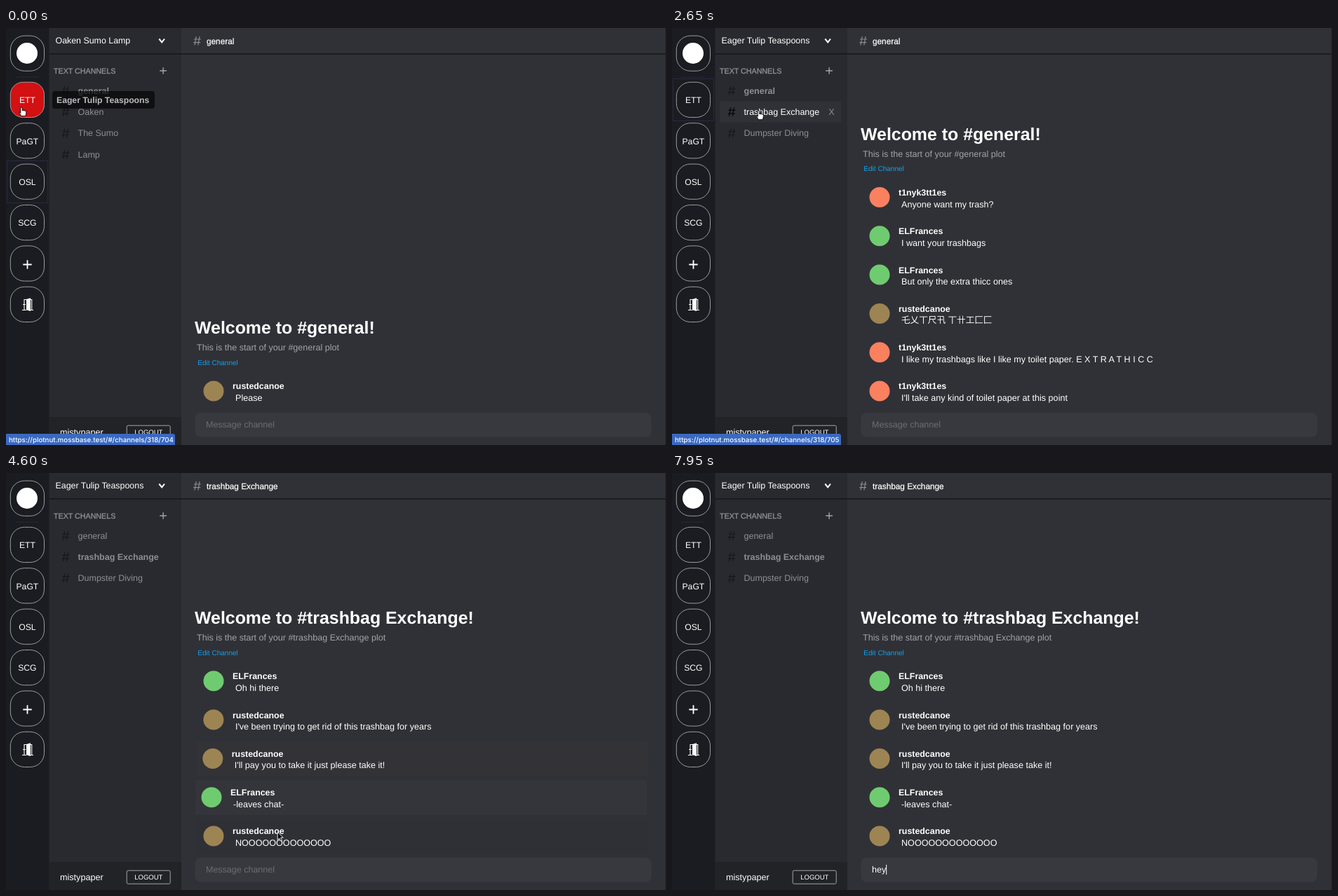
These frames come from a looping animation (941x595 px, 8000 ms). An HTML page:

```html
<!DOCTYPE html>
<html lang="en">
<head>
<meta charset="utf-8">
<title>Chat rooms</title>
<style>
  html, body { margin: 0; width: 100%; height: 100%; overflow: hidden; background: #303136; }
  svg { display: block; width: 100vw; height: 100vh; }
  text { font: 12.6px "Liberation Sans", Arial, "Noto Sans CJK JP", sans-serif; fill: #fff; text-rendering: geometricPrecision; white-space: pre; }
  .bold { font-weight: 700; }
  .mid { text-anchor: middle; }
  .line { fill: none; stroke: #fff; }
  .tile { fill: #1b1c21; stroke: #9c9da0; }
  .focus { fill: none; stroke: #272841; }
  .channel text { fill: #8d8e92; }
  .channel .hash { stroke: #17181b; }
  .channel .over { visibility: hidden; }
  .channel.hover .over { visibility: visible; }
  .channel.hover .label { fill: #fff; }
  .channel.hover .hash { stroke: #050506; }
</style>
</head>
<body>
<svg id="stage" viewBox="0 0 941 595" preserveAspectRatio="none"></svg>
<script>
const LOOP = 8000;
const SERVERS = { oaken: "Oaken Sumo Lamp", eager: "Eager Tulip Teaspoons" };
const LINK = "https://plotnut.mossbase.test/#/channels/318/";
const CORAL = ["t1nyk3tt1es", "#fb8060"], GREEN = ["ELFrances", "#6fcb70"], BROWN = ["rustedcanoe", "#9d8453"];
const OAKEN_LIST = ["general", "Oaken", "The Sumo", "Lamp"];
const EAGER_LIST = ["general", "trashbag Exchange", "Dumpster Diving"];

const scenes = [
  { from: 0, server: SERVERS.oaken, list: OAKEN_LIST, channel: "general", rows: [[BROWN, "Please"]] },
  { from: 1000, server: SERVERS.eager, list: OAKEN_LIST, channel: "", rows: [] },
  { from: 1450, server: SERVERS.eager, list: EAGER_LIST, channel: "general", rows: [
    [CORAL, "Anyone want my trash?"],
    [GREEN, "I want your trashbags"],
    [GREEN, "But only the extra thicc ones"],
    [BROWN, "乇乂丅尺卂 丅卄工匚匚"],
    [CORAL, "I like my trashbags like I like my toilet paper. E X T R A T H I C C"],
    [CORAL, "I'll take any kind of toilet paper at this point"]] },
  { from: 3000, server: SERVERS.eager, list: EAGER_LIST, channel: "trashbag Exchange", rows: [
    [GREEN, "Oh hi there"],
    [BROWN, "I've been trying to get rid of this trashbag for years"],
    [BROWN, "I'll pay you to take it just please take it!"],
    [GREEN, "-leaves chat-"],
    [BROWN, "NOOOOOOOOOOOOO"]] }
];

// Pointer stops: time, x, y
const path = [
  [0, 24, 119.5], [300, 24, 116.5], [1900, 24, 116.5], [2050, 45, 117], [2250, 95, 121],
  [2500, 125.5, 124.5], [2700, 125.5, 124.5], [3100, 139.5, 120], [3600, 139.5, 120],
  [4000, 235, 230], [4300, 320, 345], [4470, 360, 438], [4600, 387, 512],
  [4800, 425, 560], [5300, 455, 577], [5900, 467.5, 573.5]
];
// Times at which the pointer enters each message row, then leaves the last
const rowTimes = [4160, 4290, 4390, 4470, 4600, 4740];
const keys = [[7100, "h"], [7250, "he"], [7400, "hey"]];

const text = (x, y, str, attrs = "") => `<text x="${x}" y="${y}" ${attrs}>${str}</text>`;
const rect = (x, y, w, h, attrs) => `<rect x="${x}" y="${y}" width="${w}" height="${h}" ${attrs}/>`;
const size = (px, fill = "#fff") => `style="font-size:${px}px;fill:${fill}"`;
const hash = (x, y, stroke) =>
  `<path class="hash" transform="translate(${x} ${y})" d="M4.2 0L2 12.5M9 0L6.8 12.5M1 4H11M.2 8.7H10.2" fill="none" stroke="${stroke}" stroke-width="1.2"/>`;

function tile(i, label) {
  const y = i ? 18.9 + i * 58.4 : 11.1;
  return rect(6.3, y, 48.2, 50.2, `rx="20" class="tile" id="tile${i}"`) +
    text(30.4, y + 29.8, label, `class="mid" ${size(12.2)}`);
}

function channelRow(name, i, current) {
  const y = 89 + i * 30.4;
  return `<g class="channel">${rect(68, y - 15, 173, 30, 'rx="2" fill="#303136" class="over"')}
    ${hash(79.5, y - 6, "#17181b")}
    ${text(102.5, y + 4.5, name, `class="label ${name === current ? "bold" : ""}" style="font-size:12.5px"`)}
    ${text(227.5, y + 5, "X", 'class="mid over"')}</g>`;
}

function messageRow([[name, color], body], y) {
  return `<g>${rect(273, y - 19.7, 644, 50, 'rx="3" fill="#35363b" opacity="0"')}
    <g class="message"><circle cx="296" cy="${y + 5}" r="14.5" fill="${color}"/>
    ${text(323, y + 2.4, name, `class="bold" ${size(12.4)}`)}
    ${text(327, y + 19, body, size(12.6))}</g></g>`;
}

function sceneMarkup({ server, list, channel, rows }) {
  const lift = 55.3 * (rows.length - 1);
  return `<g class="scene">
    ${text(70.5, 22, server, size(12.4))}
    ${list.map((name, i) => channelRow(name, i, channel)).join("")}
    ${text(286, 23, channel, `${size(11.8)} stroke="#fff" stroke-width=".25"`)}
    ${text(269, 436 - lift, `Welcome to #${channel}!`, `class="bold" ${size(24.9)}`)}
    ${text(272, 460.3 - lift, `This is the start of your #${channel} plot`, size(12.55, "#a2a3a6"))}
    ${text(273.3, 480.7 - lift, "Edit Channel", size(10.05, "#10a0ee"))}
    ${rows.map((row, i) => messageRow(row, 513 - lift + i * 55.3)).join("")}</g>`;
}

const beam = "M-3.5-6.5Q0-6.5 0-4.5V4.5Q0 6.5-3.5 6.5M3.5-6.5Q0-6.5 0-4.5V4.5Q0 6.5 3.5 6.5";
const stage = document.getElementById("stage");
stage.innerHTML = `
  ${rect(0, 0, 941, 595, 'fill="#303136"')}
  ${rect(0, 0, 62, 595, 'fill="#1b1c21"')}
  ${rect(61.5, 0, 188.5, 595, 'fill="#292a2f"')}
  ${rect(61.5, 555, 188.5, 40, 'fill="#222327"')}
  ${rect(61.5, 36.2, 880, 1.6, 'fill="#17181b"')}
  ${rect(940, 0, 1, 595, 'fill="#242428"')}
  ${rect(13, 69.5, 34, 1, 'fill="#282a33"')}
  <rect id="focus" class="focus" x="1.5" width="58" height="60"/>
  ${["", "ETT", "PaGT", "OSL", "SCG", "", ""].map((label, i) => tile(i, label)).join("")}
  <circle cx="30" cy="36" r="15" fill="#fff"/>
  <path class="line" d="M24.3 337.5H36.7M30.5 331.3V343.7" stroke-width="1.8"/>
  <path d="M29 387L35 385.3V404L29 402.3Z" fill="#fff"/>
  <path class="line" d="M23 402.5H29M35 402.5H39M26 402V387.5H29M35 387.5H36.7V402M24 394.5H28" stroke-width="1.1"/>
  <path class="line" d="M218.3 15.5L222.2 20.3L226 15.5" stroke-width="2"/>
  ${text(68, 64.6, "TEXT CHANNELS", `${size(10.7, "#929397")} stroke="#929397" stroke-width=".3"`)}
  <path class="line" d="M219.3 61H228.9M224.1 56.2V65.8" style="stroke:#a4a5a8" stroke-width="1.4"/>
  ${hash(267, 12, "#8b8c90")}
  ${scenes.map(sceneMarkup).join("")}
  ${rect(269.5, 549, 650.5, 34.5, 'rx="8" fill="#38393e"')}
  <text id="field" x="285" y="570.2" style="font-size:12.5px"></text>
  <rect id="caret" y="559" width="1" height="14" fill="#fff"/>
  ${text(77, 580.6, "mistypaper")}
  ${rect(172.2, 567.2, 62, 19, 'rx="2" class="line" style="stroke:#a3a4a7"')}
  ${text(203.3, 580.4, "LOGOUT", `class="mid" ${size(9.5)}`)}
  <g id="tooltip">${rect(66, 90, 146, 25, 'rx="4" fill="#050506"')}
    ${text(72, 106.8, SERVERS.eager, `class="bold" ${size(12.2)}`)}</g>
  <g id="status"><path id="bar" fill="#3a69c1"/>
    <text id="url" x="4" y="590.6" style="font:500 9.75px Inter, 'Open Sans', sans-serif"></text></g>
  <g id="pointer">
    <path id="hand" d="M-3.2 2V-5q0-1.4 1.2-1.4t1.2 1.4V-1.6q1-1 1.9 .1q1.1-.8 1.9 .2q1.3-.5 1.8 .8V2.5L3.8 6.2H-2L-5 1.8q-.6-1.5 .6-1.4z" fill="#fff" stroke="#000" stroke-width=".9"/>
    <path id="arrow" d="M0 0V11.2l2.6-2.4 1.7 4 1.9-.8-1.7-3.9H8z" fill="#000" stroke="#fff" stroke-width=".9"/>
    <g id="beam" fill="none"><path d="${beam}" stroke="#eee" stroke-width="2.4"/><path d="${beam}" stroke="#222" stroke-width=".9"/></g>
  </g>`;

const $ = id => document.getElementById(id);
const sceneNodes = [...stage.querySelectorAll(".scene")].map(node => ({
  node,
  channels: [...node.querySelectorAll(".channel")],
  messages: [...node.querySelectorAll(".message")]
}));
const set = (node, attrs) => { for (const k in attrs) node.setAttribute(k, attrs[k]); };
const show = (node, on) => { node.style.display = on ? "" : "none"; };
const ramp = (t, from, to) => Math.min(1, Math.max(0, (t - from) / (to - from)));

function pointerAt(t) {
  const next = path.findIndex(p => p[0] > t);
  if (next < 0) return path[path.length - 1].slice(1);
  const [t0, x0, y0] = path[next - 1], [t1, x1, y1] = path[next];
  const k = ramp(t, t0, t1);
  return [x0 + (x1 - x0) * k, y0 + (y1 - y0) * k];
}

function drawStatus(t) {
  const second = t >= 2140;
  const grow = second ? ramp(t, 3000, 3250) : ramp(t, 680, 930);
  const w = 241 + 131 * grow;
  set($("bar"), { d: `M0 579H${w - 3}q3 0 3 3V595H0Z` });
  $("url").textContent = LINK + (second ? 705 : 704);
  $("status").style.opacity = 1 - ramp(t, 3780, 3950);
}

function drawField(t) {
  const typed = keys.reduce((last, [at, str]) => t >= at ? str : last, "");
  const field = $("field");
  field.textContent = typed || "Message channel";
  field.style.fill = typed ? "#fff" : "#6c6d72";
  show($("caret"), t >= 6900);
  set($("caret"), { x: 285 + (typed ? field.getComputedTextLength() : 0) });
}

function drawMessages(t, messages) {
  messages.forEach((row, i) => {
    const enter = rowTimes[i], leave = rowTimes[i + 1];
    const amount = ramp(t, enter, enter + 80) * (1 - ramp(t, leave, leave + 220));
    const transform = `translate(${-3 * amount} 0)`;
    set(row, { transform });
    set(row.previousElementSibling, { opacity: amount, transform });
  });
}

function render(t) {
  const current = scenes.reduce((last, s, i) => t >= s.from ? i : last, 0);
  sceneNodes.forEach((s, i) => show(s.node, i === current));

  const [x, y] = pointerAt(t);
  const overTile = x < 55;
  const hovered = x > 68 && x < 241 ? Math.floor((y - 74) / 30.4) : -1;
  const { channels, messages } = sceneNodes[current];
  channels.forEach((c, i) => c.classList.toggle("hover", i === hovered));
  if (current === 3) drawMessages(t, messages);

  $("tile1").style.fill = overTile ? "#d31012" : "";
  set($("tile1"), { rx: overTile ? 18 - 6 * ramp(t, 0, 300) : 12 + 8 * ramp(t, 2090, 2390) });
  $("tooltip").style.opacity = Math.min(0.68 + t / 400, 1 - ramp(t, 2090, 2290));
  show($("focus"), t < 900 || t > 1900 && t < 3000);
  set($("focus"), { y: t < 900 ? 189.5 : 72.5 });

  const onLink = overTile || hovered >= 0 && hovered < channels.length;
  const onField = y > 549;
  set($("pointer"), { transform: `translate(${x} ${y})` });
  show($("pointer"), t < keys[0][0]);
  show($("hand"), onLink);
  show($("beam"), onField);
  show($("arrow"), !onLink && !onField);

  drawStatus(t);
  drawField(t);
}

const start = performance.now();
function frame() {
  render((performance.now() - start) % LOOP);
  requestAnimationFrame(frame);
}
frame();
</script>
</body>
</html>
```
